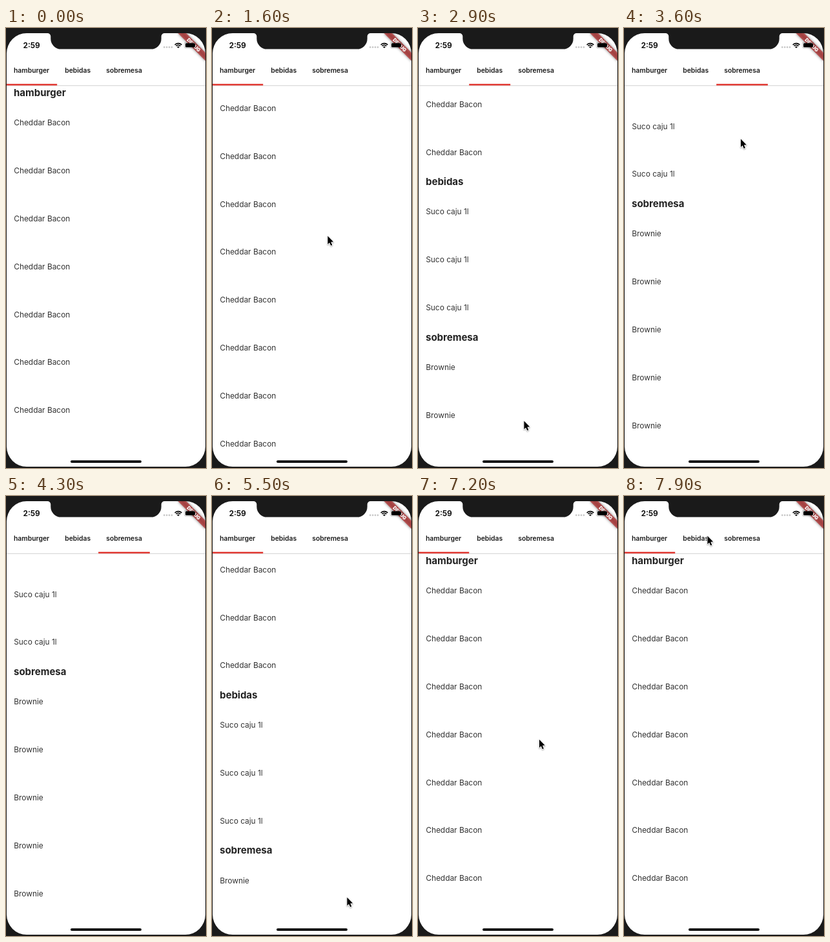
An HTML page with a canvas that plays this animation: 310 px wide and 678 px high, repeating every 8000 ms.

```html
<!DOCTYPE html>
<html lang="pt">
<head>
<meta charset="utf-8">
<title>Menu</title>
<style>
  html, body { margin: 0; width: 100%; height: 100%; overflow: hidden; background: #1a1a1a; }
  canvas { display: block; width: 310px; height: 678px; }
</style>
</head>
<body>
<canvas id="stage"></canvas>
<script>
const W = 310, H = 678, LOOP = 8000, STEP = 100;
const canvas = document.getElementById('stage');
const ctx = canvas.getContext('2d');
const dpr = window.devicePixelRatio || 1;
canvas.width = W * dpr;
canvas.height = H * dpr;

const FRAME = '#1a1a1a', RED = '#e2403a';
const PAD = 12, LIST_TOP = 89, LIST_BOTTOM = 652;
const ITEM_GAP = 73.85, HEAD_GAP = 45.9;

const sections = [
  { title: 'hamburger', item: 'Cheddar Bacon', count: 10 },
  { title: 'bebidas', item: 'Suco caju 1l', count: 3 },
  { title: 'sobremesa', item: 'Brownie', count: 5 }
];

const swipes = [
  { from: 1100, to: 2500, by: 583 },
  { from: 2680, to: 3580, by: 242 },
  { from: 4400, to: 5500, by: -275.5 },
  { from: 5880, to: 6985, by: -549.5 }
];

// Pointer stops, eased between
const stops = [
  { t: 100, x: 298, y: 90 }, { t: 300, x: 195, y: 265 }, { t: 600, x: 195, y: 265 },
  { t: 1100, x: 190, y: 640 }, { t: 1600, x: 179, y: 320 }, { t: 2000, x: 175, y: 130 },
  { t: 2500, x: 165, y: 655 }, { t: 2900, x: 164, y: 605 }, { t: 3500, x: 172, y: 160 },
  { t: 4100, x: 288, y: 300 }, { t: 4400, x: 285, y: 340 }, { t: 5500, x: 209, y: 618 },
  { t: 6100, x: 199, y: 100 }, { t: 6600, x: 198, y: 244 }, { t: 7000, x: 196, y: 420 },
  { t: 7900, x: 129, y: 61 }
];

const clamp = v => Math.min(1, Math.max(0, v));
const mix = (a, b, k) => a + (b - a) * k;
const ease = (v, from, to) => {
  const k = clamp((v - from) / (to - from));
  return k * k * (3 - 2 * k);
};

const scrollAt = t => swipes.reduce((sum, s) => sum + s.by * ease(t, s.from, s.to), 0);

// The tab follows whichever section nears the top
const tabAt = scroll => ease(scroll, 555, 580) + ease(scroll, 790, 820);

function pointerAt(t) {
  const i = stops.findIndex(s => s.t >= t);
  if (i < 1) return stops[Math.max(i, 0)];
  const a = stops[i - 1], b = stops[i], k = ease(t, a.t, b.t);
  return { x: mix(a.x, b.x, k), y: mix(a.y, b.y, k) };
}

const font = (size, weight) => `${weight} ${size}px Inter, Roboto, sans-serif`;

function label(str, x, y, size, weight, color) {
  ctx.font = font(size, weight);
  ctx.fillStyle = color;
  ctx.fillText(str, x, y);
}

function pill(x, y, w, h, r, color) {
  ctx.beginPath();
  ctx.roundRect(x, y, w, h, r);
  ctx.fillStyle = color;
  ctx.fill();
}

const rows = [];
let rowY = 100;
for (const { title, item, count } of sections) {
  rows.push({ text: title, y: rowY, head: true });
  rowY += HEAD_GAP;
  for (let i = 0; i < count; i++) {
    rows.push({ text: item, y: rowY, head: false });
    rowY += i < count - 1 ? ITEM_GAP : HEAD_GAP;
  }
}

ctx.font = font(10.4, 600);
let tabX = 0;
const tabs = sections.map(({ title }) => {
  const tab = { title, x: tabX, w: ctx.measureText(title).width + 2 * PAD };
  tabX += tab.w;
  return tab;
});

function drawList(scroll) {
  ctx.save();
  ctx.beginPath();
  ctx.rect(0, LIST_TOP, W, LIST_BOTTOM - LIST_TOP);
  ctx.clip();
  for (const row of rows) {
    const y = row.y - scroll;
    if (row.head) label(row.text, PAD, y + 5, 15, 700, '#222');
    else label(row.text, PAD + 0.2, y + 4.3, 11.9, 400, '#333');
  }
  ctx.restore();
}

function drawTabs(pos) {
  ctx.fillStyle = '#dedede';
  ctx.fillRect(1, 88, 308, 1);
  ctx.fillStyle = '#f1f1f1';
  ctx.fillRect(1, 89, 308, 1);
  for (const tab of tabs) label(tab.title, tab.x + PAD, 68.6, 10.4, 600, '#1c1c1c');
  const i = Math.min(1, Math.floor(pos)), a = tabs[i], b = tabs[i + 1];
  ctx.fillStyle = RED;
  ctx.fillRect(mix(a.x, b.x, pos - i), 86, mix(a.w, b.w, pos - i), 2.6);
}

function drawRibbon() {
  ctx.save();
  ctx.translate(309, 8);
  ctx.rotate(Math.PI / 4);
  ctx.filter = `blur(${2 * dpr}px)`;
  ctx.fillStyle = 'rgba(0,0,0,.5)';
  ctx.fillRect(-30, 21, 60, 9);
  ctx.filter = 'none';
  ctx.fillStyle = 'rgba(183,28,28,.63)';
  ctx.fillRect(-30, 21, 60, 9);
  ctx.textAlign = 'center';
  label('DEBUG', 0, 28.3, 7.6, 900, '#fff');
  ctx.restore();
}

function wifiArc(r) {
  ctx.arc(267, 31, r, -Math.PI * 0.76, -Math.PI * 0.24);
}

function drawStatus() {
  label('2:59', 26.4, 31.2, 12, 600, '#000');
  for (let i = 0; i < 4; i++) pill(244 + i * 3.9, 28.3, 2.6, 2.6, 1.3, '#c4c4c4');

  ctx.strokeStyle = ctx.fillStyle = '#000';
  ctx.lineWidth = 1.7;
  for (const r of [7.3, 4.7]) {
    ctx.beginPath();
    wifiArc(r);
    ctx.stroke();
  }
  ctx.beginPath();
  ctx.moveTo(267, 31);
  wifiArc(2.7);
  ctx.fill();

  ctx.beginPath();
  ctx.roundRect(276.5, 21.8, 18, 9.4, 2.6);
  ctx.strokeStyle = 'rgba(0,0,0,.3)';
  ctx.lineWidth = 0.8;
  ctx.stroke();
  pill(278, 23.2, 15, 6.6, 1.6, '#000');
  pill(295.4, 25, 1.1, 3, 0.5, 'rgba(0,0,0,.4)');
}

function drawNotch() {
  const left = 69.3, right = W - left, bottom = 32.6, flare = 5, r = 16;
  ctx.beginPath();
  ctx.moveTo(left - flare, 7);
  ctx.lineTo(left - flare, 8);
  ctx.arcTo(left, 8, left, 8 + flare, flare);
  ctx.arcTo(left, bottom, left + r, bottom, r);
  ctx.arcTo(right, bottom, right, bottom - r, r);
  ctx.arcTo(right, 8, right + flare, 8, flare);
  ctx.lineTo(right + flare, 7);
  ctx.fillStyle = FRAME;
  ctx.fill();
}

const arrow = new Path2D('M0 0V14L3.1 11.2 5.4 16.4 7.7 15.4 5.5 10.3 9.8 10Z');

function drawPointer({ x, y }) {
  ctx.save();
  ctx.translate(x + 0.4, y + 0.6);
  ctx.scale(0.9, 0.9);
  ctx.shadowColor = 'rgba(0,0,0,.35)';
  ctx.shadowBlur = 2 * dpr;
  ctx.shadowOffsetY = dpr;
  ctx.lineJoin = 'round';
  ctx.lineWidth = 2;
  ctx.strokeStyle = '#fff';
  ctx.stroke(arrow);
  ctx.shadowColor = 'transparent';
  ctx.fillStyle = '#000';
  ctx.fill(arrow);
  ctx.restore();
}

function render(t) {
  const scroll = scrollAt(t);
  ctx.setTransform(dpr, 0, 0, dpr, 0, 0);
  ctx.fillStyle = FRAME;
  ctx.fillRect(0, 0, W, H);

  ctx.save();
  ctx.beginPath();
  ctx.roundRect(1, 8, 308, 668, 31);
  ctx.fillStyle = '#fff';
  ctx.fill();
  ctx.clip();
  drawList(scroll);
  drawTabs(tabAt(scroll));
  drawRibbon();
  drawStatus();
  pill(100, 666.2, 110, 3.7, 1.85, '#000');
  ctx.restore();

  drawNotch();
  const away = t < 100 || (t > 4100 && t < 4400);
  if (!away) drawPointer(pointerAt(t));
}

const start = performance.now();
function tick() {
  const t = (performance.now() - start) % LOOP;
  render(Math.floor(t / STEP) * STEP);
  requestAnimationFrame(tick);
}
tick();
</script>
</body>
</html>
```
